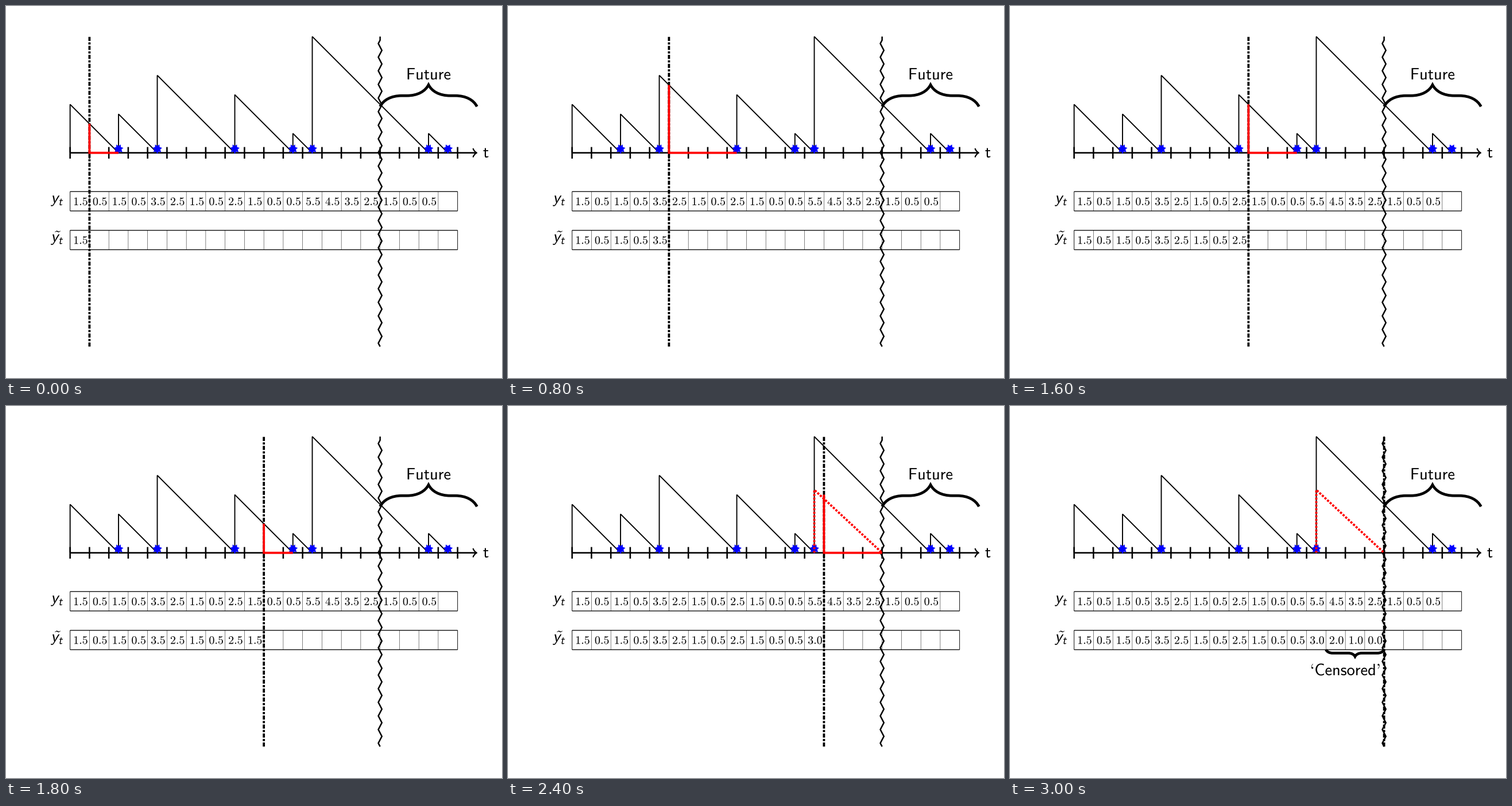
Recreate the animation shown at these times as a matplotlib script. Size 864 px wide and 648 px high, loop 3200 ms.

```python
import math

import matplotlib.pyplot as plt
from matplotlib.animation import FuncAnimation
from matplotlib.patches import PathPatch, Polygon
from matplotlib.path import Path
from matplotlib.textpath import TextPath
from matplotlib.transforms import Affine2D

plt.rcParams.update({
    "mathtext.fontset": "cm",
    "lines.scale_dashes": False,
    "path.snap": False,
    "lines.dash_capstyle": "butt",
    "lines.solid_capstyle": "butt",
    "lines.solid_joinstyle": "miter",
    "lines.dash_joinstyle": "miter",
})

W, H = 864, 648
UNIT = 33.75
X0, AXIS = 111.65, 255.75
TOP, BOTTOM = 53.25, 593.25
ROWS = (323.25, 390.75)
CELLS, NOW = 20, 16
PT = 2.3723
BIG, SMALL = 28.4, 20
EVENTS = [2.5, 4.5, 8.5, 11.5, 12.5, 18.5, 19.5]
LAST = 12.5  # last event before the future starts

fig = plt.figure(figsize=(W / 72, H / 72), dpi=72, facecolor="white")
ax = fig.add_axes([0, 0, 1, 1])
ax.set_xlim(0, W)
ax.set_ylim(H, 0)
ax.axis("off")


def px(u):
    return X0 + UNIT * u


def py(u):
    return AXIS - UNIT * u


def line(xs, ys, lw, color="black", z=2, **kw):
    return ax.plot(xs, ys, lw=lw, color=color, zorder=z, **kw)[0]


def glyphs(s, x, y, size, slant=0.0, turn=0):
    """Sans text with its baseline starting at (x, y)."""
    path = TextPath((0, 0), s, size=size)
    if turn:
        box = path.get_extents()
        path = Affine2D().rotate_deg_around(
            (box.x0 + box.x1) / 2, (box.y0 + box.y1) / 2, turn
        ).transform_path(path)
    tr = Affine2D.from_values(1, 0, slant, 1, 0, 0).scale(1, -1).translate(x, y)
    return ax.add_patch(PathPatch(tr.transform_path(path), fc="black", lw=0, zorder=6))


def sans(s, x, y, size, **kw):
    return glyphs(rf"$\mathsf{{{s}}}$", x, y, size, **kw)


def brace(xa, xb, y, amp, sign):
    """Curly brace from xa to xb, tip pointing up (-1) or down (+1)."""
    half, a = (xb - xa) / 2, amp
    left = [(0, 0), (.15 * a, .3 * a), (.5 * a, .5 * a), (a, .5 * a),
            (half - a, .5 * a), (half - .5 * a, .5 * a),
            (half - .15 * a, .7 * a), (half, a)]
    pts = left + [(2 * half - u, v) for u, v in left[-2::-1]]
    side = [Path.CURVE4] * 3 + [Path.LINETO] + [Path.CURVE4] * 3
    verts = [(xa + u, y + sign * v) for u, v in pts]
    return ax.add_patch(PathPatch(Path(verts, [Path.MOVETO] + side * 2), fc="none",
                                  ec="black", lw=2 * PT, capstyle="butt",
                                  joinstyle="miter", zorder=4))


def wait(t):
    return next(e for e in EVENTS if e > t) - t


def cell_text(row, i, value):
    x = px(i + 0.5) + 1.4 - 1.278 * SMALL / 2
    return sans(f"{value:.1f}", x, ROWS[row] + 23.7, SMALL)


# time axis
line([px(0), 819], [AXIS] * 2, 2.6)
for i in range(CELLS + 1):
    line([px(i)] * 2, [AXIS - 10.1, AXIS + 10.1], 2.6)
tip = [(-6.2, -7), (-5.2, -3.8), (-1.8, -.6), (0, 0), (-1.8, .6), (-5.2, 3.8), (-6.2, 7)]
ax.add_patch(PathPatch(Path([(820 + u, AXIS + v) for u, v in tip],
                            [Path.MOVETO] + [Path.CURVE4] * 6),
                       fc="none", ec="black", lw=2.2, capstyle="round",
                       joinstyle="round", zorder=2))
sans("t", 831, 264, BIG)

# time to next event
saw = [(0, 0)]
for a, b in zip([0] + EVENTS, EVENTS):
    saw += [(a, b - a), (b, 0)]
line([px(u) for u, _ in saw], [py(v) for _, v in saw], 1.9)

for e in EVENTS:
    star = []
    for j in range(14):
        r, ang = (8.6, 5.2)[j % 2], math.pi / 2 + j * math.pi / 7
        star.append((px(e) + r * math.cos(ang), py(0.2) + r * math.sin(ang)))
    ax.add_patch(Polygon(star, fc="blue", lw=0, zorder=3))

# tables
for y in ROWS:
    for edge in (y, y + UNIT):
        line([px(0), px(CELLS)], [edge] * 2, 1.3)
    for i in range(CELLS + 1):
        line([px(i)] * 2, [y, y + UNIT], 0.95 if i in (0, CELLS) else 0.5)
for i in range(CELLS - 1):
    cell_text(0, i, wait(i + 1))
for s, y in ((r"$\mathsf{y}$", 343), (r"$\tilde{\mathsf{y}}$", 410.5)):
    glyphs(s, 78, y, BIG, slant=0.2126)
    sans("t", 91, y + 4.2, 0.7 * BIG, slant=0.2126)

# border of the future
half = 5 * PT
tips = [(px(NOW) + (3.1 if j % 2 else -3.1), BOTTOM - half * (j + 0.5)) for j in range(45)]
zig = [(px(NOW), BOTTOM)] + tips + [(px(NOW), BOTTOM - 45 * half), (px(NOW), TOP)]
line(*zip(*zig), 2.5)
brace(px(16), px(21), 175.2, 16 * PT, -1)
sans("Future", 697, 128, BIG)

# moving parts
LW = 1.6 * PT
cursor = line([], [], LW, z=4, ls=(0, (3 * PT, PT, LW, PT)))
guess = line([px(LAST), px(LAST), px(NOW)], [AXIS, py(3.25), AXIS], LW, "red", 5,
             ls=(0, (LW, PT)))
gap = line([], [], LW, "red", 5)
seen = [cell_text(1, i, wait(i + 1) if i + 1 < LAST else NOW - i - 1) for i in range(NOW)]
cx = px(14) - 4.342 * BIG / 2
censored = [
    brace(px(13), px(16), ROWS[1] + UNIT, 5 * PT, 1),
    sans(",", cx, 469 - 0.59 * BIG, BIG, turn=180),
    sans("Censored", cx + 0.278 * BIG, 469, BIG),
    sans(",", cx + 4.064 * BIG, 469 - 0.59 * BIG, BIG),
]


def update(k):
    t = k + 1
    left = wait(t) if t < LAST else NOW - t
    cursor.set_data([px(t)] * 2, [BOTTOM, TOP])
    if left:
        gap.set_data([px(t), px(t), px(t + left)], [py(left), AXIS, AXIS])
    else:
        gap.set_data([], [])
    guess.set_visible(t > LAST)
    for i, cell in enumerate(seen):
        cell.set_visible(i < t)
    for part in censored:
        part.set_visible(t == NOW)
    return [cursor, gap, guess, *seen, *censored]


anim = FuncAnimation(fig, update, frames=NOW, interval=200, repeat=True, repeat_delay=0)
plt.show()
```
